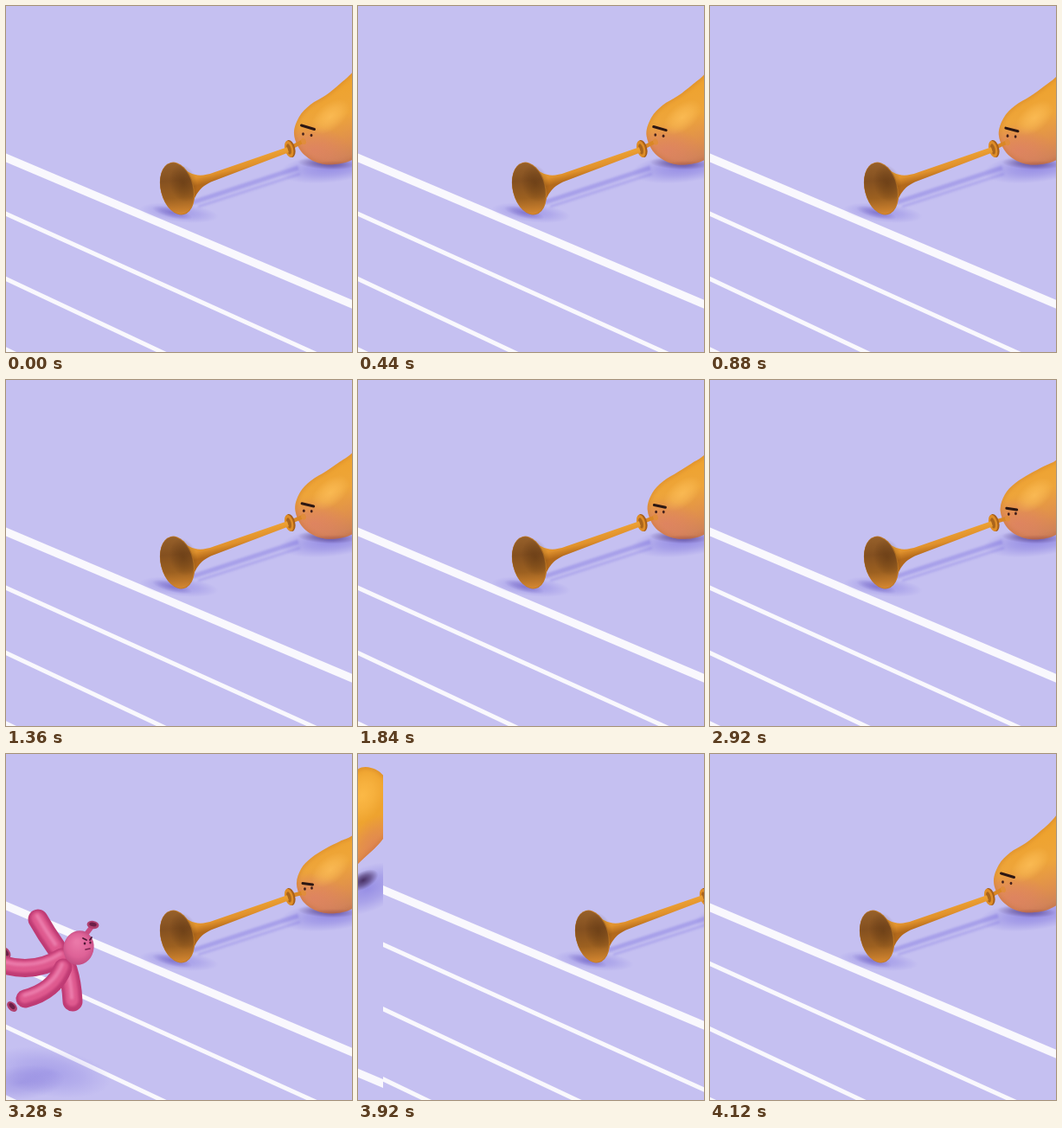
Recreate the animation shown at these times as an HTML page with a canvas. Size 400 px wide and 400 px high, loop 4.16 s.

```html
<!DOCTYPE html>
<html lang="en">
<head>
<meta charset="utf-8">
<title>Trumpet and runner</title>
<style>
html, body { margin: 0; width: 100%; height: 100%; overflow: hidden; background: #c5c0f1; }
canvas { display: block; width: 400px; height: 400px; }
</style>
</head>
<body>
<canvas id="stage" width="400" height="400"></canvas>
<script>
const c = document.getElementById('stage').getContext('2d');
const LOOP = 4160, LEFT = -44, WIDTH = 530, PAN = 3500, PAN_TIME = 548;
const mix = (a, b, k) => a + (b - a) * k;
const clamp = v => Math.max(0, Math.min(1, v));

function linear(x0, y0, x1, y1, ...colors) {
  const g = c.createLinearGradient(x0, y0, x1, y1);
  colors.forEach((col, i) => g.addColorStop(i / (colors.length - 1), col));
  return g;
}

function glow(x, y, rx, ry, turn, rgb, alpha) {
  c.save();
  c.translate(x, y);
  c.rotate(turn);
  c.scale(rx, ry);
  const g = c.createRadialGradient(0, 0, 0, 0, 0, 1);
  g.addColorStop(0, `rgba(${rgb},${alpha})`);
  g.addColorStop(.5, `rgba(${rgb},${alpha * .6})`);
  g.addColorStop(1, `rgba(${rgb},0)`);
  c.fillStyle = g;
  c.fillRect(-1, -1, 2, 2);
  c.restore();
}

function oval(x, y, rx, ry, turn, fill) {
  c.beginPath();
  c.ellipse(x, y, rx, ry, turn, 0, 7);
  c.fillStyle = fill;
  c.fill();
}

function line(x0, y0, x1, y1, width, color, cap = 'butt') {
  c.beginPath();
  c.moveTo(x0, y0);
  c.lineTo(x1, y1);
  c.lineWidth = width;
  c.lineCap = cap;
  c.strokeStyle = color;
  c.stroke();
}

// Closed Catmull-Rom curve
function blob(pts) {
  const n = pts.length, at = i => pts[(i + n) % n];
  c.beginPath();
  c.moveTo(...pts[0]);
  for (let i = 0; i < n; i++) {
    const [a, b, d, e] = [at(i - 1), at(i), at(i + 1), at(i + 2)];
    c.bezierCurveTo(b[0] + (d[0] - a[0]) / 6, b[1] + (d[1] - a[1]) / 6,
      d[0] - (e[0] - b[0]) / 6, d[1] - (e[1] - b[1]) / 6, d[0], d[1]);
  }
  c.closePath();
}

function track() {
  c.fillStyle = '#c5c0f1';
  c.fillRect(LEFT, 0, WIDTH, 400);
  for (const [y, slope, width] of [[175.5, .423, 9.2], [240.2, .452, 5], [315.5, .47, 5], [397, .48, 5]])
    line(-60, y - 60 * slope, 500, y + 500 * slope, width, '#f9f8fd');
}

function shadows() {
  const violet = '121,110,220';
  c.save();
  c.filter = 'blur(1.2px)';
  line(216, 227, 338, 187, 5, 'rgba(140,130,228,.5)');
  line(222, 232, 340, 194, 3, 'rgba(140,130,228,.35)');
  c.restore();
  glow(200, 239, 46, 11, .1, violet, .45);
  glow(192, 239, 24, 6, .25, '90,74,180', .45);
  glow(378, 186, 62, 18, -.12, violet, .65);
  glow(468, 156, 50, 26, -.4, violet, .6);
  glow(371, 182, 34, 7, .05, '70,45,110', .6);
  glow(463, 146, 19, 10, -.5, '62,36,86', .9);
}

const START = [[333, 148], [339, 128], [352, 114], [370, 103], [386, 90], [402, 75], [424, 46],
  [440, 25], [456, 16], [472, 16], [488, 27], [505, 60], [486, 98], [456, 128], [430, 156],
  [402, 177], [380, 183], [360, 181], [342, 169]];
const SAG = [[3, 3], [2, 5], [1, 6], [0, 6], [0, 11], [0, 18], [0, 22], [0, 13], [0, 2]];
SAG[15] = [0, 1]; SAG[16] = [2, 1]; SAG[17] = [1, 1]; SAG[18] = [2, 2];

function player(k) {
  const pts = START.map(([x, y], i) => {
    const [dx, dy] = SAG[i] || [0, 0];
    return [x + dx * k, y + dy * k];
  });
  c.save();
  blob(pts);
  c.clip();
  c.fillStyle = linear(372, 95, 392, 190, '#eea32f', '#eea53a', '#df8f4c', '#c57a60');
  c.fillRect(320, 0, 200, 200);
  glow(356, 166, 42, 28, .1, '222,128,104', .7);
  glow(476, 108, 30, 45, .7, '218,122,92', .75);
  glow(375, 128 + 6 * k, 26, 15, -.7, '255,194,92', .7);
  glow(462, 48, 25, 34, .5, '255,190,76', .8);
  blob(pts);
  c.filter = 'blur(2px)';
  c.strokeStyle = 'rgba(180,95,35,.35)';
  c.lineWidth = 3;
  c.stroke();
  c.filter = 'none';
  glow(380, 188, 45, 9, 0, '120,52,74', .5);
  c.restore();
}

function face(k) {
  const dark = '#43201c';
  line(mix(341.5, 343, k), mix(138, 149.5, k), mix(356.5, 354.5, k), mix(142.5, 151, k), 3, '#2c1713', 'round');
  oval(mix(343.5, 345.5, k), mix(148, 156, k), 1.4, 1.8, 0, dark);
  oval(mix(353, 353.5, k), mix(149.5, 155, k), 1.4, 1.8, 0, dark);
}

function horn(k) {
  const brass = linear(262, 180, 266, 197, '#eca033', '#e0912c', '#b3691b');
  const lips = mix(156.5, 160.5, k);
  line(329, 164, 343, lips, 4.5, '#d98726', 'round');
  oval(344, lips, 2.8, 3.6, -.3, '#e18d3c');
  oval(328.7, 165, 5.5, 10.3, -.25, '#a8601b');
  oval(327.2, 165.3, 4.8, 9.8, -.25, '#df8d27');
  oval(327, 165.5, 2.6, 6.3, -.25, '#a9651d');
  c.beginPath();
  c.moveTo(200, 184);
  c.bezierCurveTo(213, 195, 222, 199, 240, 192.5);
  c.lineTo(325, 163.2);
  c.lineTo(327, 169.2);
  c.lineTo(242, 201.5);
  c.bezierCurveTo(227, 207, 221, 213, 214, 232);
  c.closePath();
  c.fillStyle = brass;
  c.fill();
  oval(198, 211, 19.2, 31, -.25, '#c27923');
  oval(197.5, 211, 18.5, 30.3, -.25, linear(198, 181, 202, 242, '#96602a', '#845020', '#9c6020', '#d98a32'));
  glow(205, 205, 16, 22, -.25, '82,46,14', .45);
}

function limb(x0, y0, mx, my, x1, y1, width) {
  const tube = (w, dx, dy, color) => {
    c.beginPath();
    c.moveTo(x0 + dx, y0 + dy);
    c.quadraticCurveTo(mx + dx, my + dy, x1 + dx, y1 + dy);
    c.lineWidth = w;
    c.strokeStyle = color;
    c.stroke();
  };
  c.lineCap = 'round';
  tube(width, 0, 0, '#bf3b74');
  c.filter = 'blur(1.5px)';
  tube(width * .64, -.5, -1.5, '#df5a8f');
  tube(width * .18, -1, -4, '#ec7fae');
  c.filter = 'none';
}

function knot(x, y, turn) {
  oval(x, y, 7, 4.6, turn, '#b0406f');
  oval(x, y - .5, 4.3, 2.4, turn, '#6b2048');
}

function swing(x, y, angle, draw) {
  c.save();
  c.translate(x, y);
  c.rotate(angle);
  c.translate(-x, -y);
  draw();
  c.restore();
}

function runner(time) {
  const d = time - 3280, step = Math.sin(d / 75) * .4;
  const ink = '#4d1736';
  c.save();
  c.translate(d, d * .43);
  glow(50, 368, 72, 28, .15, '121,110,220', .38);
  glow(18, 380, 50, 20, -.1, '111,98,210', .35);
  swing(62, 232, step, () => limb(37, 191, 46, 207, 58, 224, 23));
  swing(73, 250, -step, () => limb(71, 249, 76, 265, 77, 286, 23));
  swing(66, 240, -step, () => {
    knot(0, 230, 1);
    limb(64, 235, 34, 254, -2, 244, 21);
  });
  swing(64, 252, step, () => {
    knot(7, 292, .8);
    limb(66, 247, 56, 274, 22, 283, 21);
  });
  line(92, 209, 99, 200, 5.5, '#c94c82', 'round');
  knot(100.5, 197.5, .15);
  const skin = c.createRadialGradient(82, 217, 2, 84, 224, 21);
  skin.addColorStop(0, '#ea78a8');
  skin.addColorStop(.6, '#de6297');
  skin.addColorStop(1, '#bf4a80');
  oval(84, 224, 17.5, 20, .25, skin);
  line(89, 213, 93, 215, 1.8, ink, 'round');
  line(97, 215, 99, 212, 1.8, ink, 'round');
  oval(91, 219, 1.3, 1.6, 0, ink);
  oval(97.5, 218, 1.2, 1.6, 0, ink);
  line(92, 226, 97, 225, 1.6, '#7d234f', 'round');
  c.restore();
}

function scene(offset, time) {
  const sag = Math.min(time / 3280, 1.08);
  c.save();
  c.translate(offset, 0);
  c.beginPath();
  c.rect(LEFT, 0, WIDTH, 400);
  c.clip();
  track();
  shadows();
  player(sag);
  horn(sag);
  face(sag);
  if (time > 3080) runner(time);
  c.restore();
}

function frame(now) {
  const time = Math.floor((now % LOOP) / 40) * 40;
  const v = clamp((time - PAN) / PAN_TIME);
  const overshoot = 10 * Math.sin(Math.PI * clamp((time - 3920) / 240));
  const offset = Math.round(-WIDTH * v * v * (3 - 2 * v) - overshoot);
  scene(offset, time);
  if (v > 0) scene(offset + WIDTH, 0);
  requestAnimationFrame(() => frame(performance.now() - begin));
}

const begin = performance.now();
frame(0);
</script>
</body>
</html>
```
